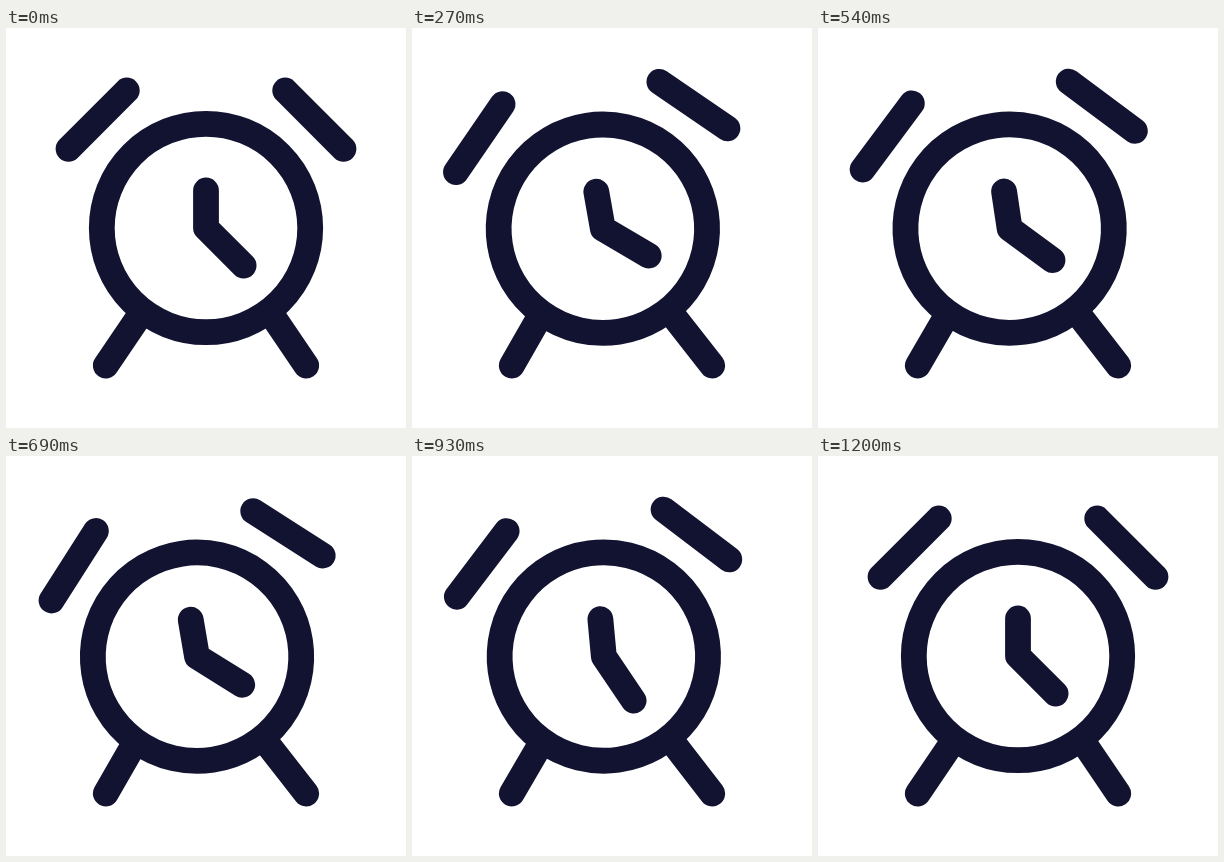
Recreate the animation shown at these times as an HTML page. Size 400 by 400 pixels, loop 1.23 s.

```html
<!DOCTYPE html>
<html lang="en">
<head>
<meta charset="utf-8">
<title>Alarm clock</title>
<style>
  html, body { margin: 0; width: 100%; height: 100%; overflow: hidden; background: #fff; }
  svg { display: block; width: 100vw; height: 100vh; }
</style>
</head>
<body>
<svg viewBox="0 0 400 400" fill="none" stroke="#121331" stroke-width="25.8" stroke-linecap="round" stroke-linejoin="round">
  <path id="feet"/>
  <g id="body">
    <circle cx="200" cy="200" r="104.2"/>
    <path id="left" d="M62.5 120.8L120.8 62.5"/>
    <path id="right" d="M279.2 62.5L337.5 120.8"/>
    <path id="hands"/>
  </g>
</svg>
<script>
  const LOOP = 1230, STEP = 30, END = 1200, RAMP = 70;
  const RAD = Math.PI / 180;
  const el = id => document.getElementById(id);
  const [feet, body, left, right, hands] = ['feet', 'body', 'left', 'right', 'hands'].map(el);

  // Swing phase: [ms, degrees]
  const swing = [[0, 0], [69, 90], [180, 392.5], [390, 923.5], [690, 1725],
                 [840, 2160], [1050, 2723.5], [1131, 2970], [END, 3060]];
  // Phase lead of the hands over the swing
  const lead = [[0, 0], [180, 0], [390, 65], [690, 0], [840, 0], [1050, -20], [END, 0]];

  function along(points, t) {
    const i = Math.max(1, points.findIndex(p => p[0] >= t));
    const [t0, a] = points[i - 1], [t1, b] = points[i];
    return a + (b - a) * (t - t0) / (t1 - t0);
  }

  const spin = (node, deg, x, y) => node.setAttribute('transform', `rotate(${deg} ${x} ${y})`);
  const tip = (deg, len) => `${200 + len * Math.sin(deg * RAD)} ${200 - len * Math.cos(deg * RAD)}`;

  function draw(t) {
    const phase = along(swing, t) * RAD;
    const handPhase = phase + along(lead, t) * RAD;
    const fade = Math.min(1, t / RAMP, (END - t) / RAMP);

    const tilt = 8.9 * Math.sin(phase);
    const bell = fade * (2.7 * Math.sin(phase) - 4.9 * Math.cos(phase));
    const hour = fade * -4.2 * Math.cos(handPhase);
    const minute = fade * (2.5 - 27 * Math.cos(handPhase));

    spin(body, tilt, 200, 260);
    spin(left, bell, 91.65, 91.65);
    spin(right, bell, 308.35, 91.65);
    hands.setAttribute('d', `M${tip(hour, 37.5)}L200 200L${tip(135 + minute, 53.2)}`);

    const dx = 33 * Math.sin(tilt * RAD);
    feet.setAttribute('d', `M99.8 337.5L${132 + dx} 290M300.2 337.5L${268 + dx} 290`);
  }

  function tick() {
    const t = performance.now() % LOOP;
    draw(Math.floor(t / STEP) * STEP);
    requestAnimationFrame(tick);
  }
  tick();
</script>
</body>
</html>
```
